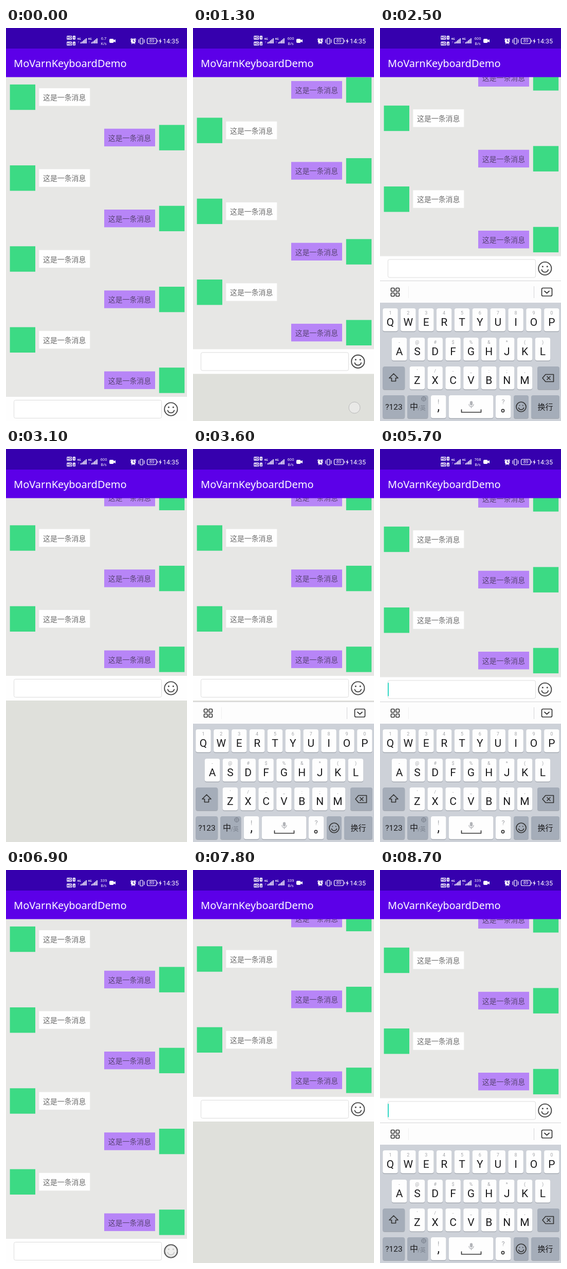
An HTML page that plays this animation: 352 px wide and 764 px high, repeating every 8.8 s.

```html
<!DOCTYPE html>
<html lang="zh">
<head>
<meta charset="utf-8">
<style>
html, body { margin: 0; width: 100%; height: 100%; overflow: hidden; background: #e7e7e5; }
svg { display: block; width: 352px; height: 764px; font-family: "Noto Sans", "Noto Sans CJK SC", "Noto Sans CJK", sans-serif; }
.mid { text-anchor: middle; }
.line { fill: none; stroke: #333; stroke-width: 1.7; stroke-linecap: round; stroke-linejoin: round; }
.white { stroke: #fff; stroke-width: 1.2; }
.key { font: 21px Roboto, "Noto Sans CJK SC", sans-serif; fill: #1b1b1d; text-anchor: middle; }
.hint { font: 9px Roboto, sans-serif; fill: #a2a4a8; text-anchor: middle; }
</style>
</head>
<body>
<svg viewBox="0 0 352 764">
  <rect width="352" height="764" fill="#e7e7e5"/>
  <g id="chat">
    <g id="list"></g>
    <rect y="764" width="352" height="300" fill="#dfe0db"/>
    <rect y="717" width="352" height="48" fill="#fefefe"/>
    <rect x="15.5" y="723.5" width="287" height="35" rx="3" fill="#fff" stroke="#dcdcdc"/>
    <rect id="caret" x="15" y="728" width="2" height="26" fill="#2fd6c4"/>
    <g class="line" style="stroke:#454545;stroke-width:1.9">
      <circle cx="320.8" cy="741" r="12.6"/>
      <path d="M314.5 743.5a6.6 6.6 0 0 0 12.6 0"/>
      <path d="M316.3 737.3h.1M325.2 737.3h.1" stroke-width="3"/>
    </g>
  </g>
  <g id="board">
    <rect y="491" width="352" height="273" fill="#cdd1d8"/>
    <rect y="491" width="352" height="43" fill="#fdfdfd"/>
    <path d="M0 491.5H352" stroke="#d3d3d5"/>
    <path d="M55.5 502v23" stroke="#f0f0f0"/>
    <path d="M299.5 502v23" stroke="#d4d4d6"/>
    <g class="line">
      <rect x="21.5" y="505.5" width="6.5" height="6.5" rx="1.5"/>
      <rect x="31" y="505.5" width="6.5" height="6.5" rx="1.5"/>
      <rect x="21.5" y="515" width="6.5" height="6.5" rx="1.5"/>
      <rect x="31" y="515" width="6.5" height="6.5" rx="1.5"/>
      <rect x="314.5" y="505.5" width="20" height="15.5" rx="2.5"/>
      <path d="M320 511.5l4.5 4 4.5-4"/>
    </g>
    <g id="keys"></g>
    <g class="line">
      <path d="M26.5 672l-8.5 8.5h4.5v6h8v-6h4.5z"/>
      <path d="M322 673.5h15.5v14H322l-6-7zM325 677.5l6 6m0-6l-6 6"/>
      <path d="M158.500 742v5h38v-5"/>
      <circle cx="274.500" cy="736.500" r="9.500"/>
      <path d="M269.500 738.500a5.300 5.300 0 0 0 10 0M271.300 733.700h.1M277.700 733.700h.1"/>
      <g style="stroke:#b2b4b8;stroke-width:1.300">
        <rect x="175.500" y="726" width="4" height="7" rx="2" fill="#b2b4b8"/>
        <path d="M173 731.500a4.500 4.500 0 0 0 9 0M177.500 736v2.500"/>
        <circle cx="85" cy="721" r="4" style="stroke:#7b828e"/>
        <path d="M81 721h8M85 717v8" style="stroke:#7b828e;stroke-width:.8"/>
      </g>
    </g>
  </g>
  <rect width="352" height="40" fill="#3600ae"/>
  <rect y="40" width="352" height="55.500" fill="#5c00e8"/>
  <text x="15" y="76" font-size="20" fill="#fff">MoVarnKeyboardDemo</text>
  <g fill="#fff">
    <g id="status"></g>
    <g font-size="7.500" class="mid"><text id="rate" x="190" y="23"></text><text id="unit" x="190" y="33"></text></g>
    <rect x="201" y="21" width="8.500" height="8" rx="2"/>
    <path d="M209 24l4-2v6l-4-2z"/>
    <circle cx="247.500" cy="25.500" r="4.800"/>
    <path d="M242 22.500l3-2.500M253 22.500l-3-2.500M244 31l1-1M251 31l-1-1" class="white"/>
    <path d="M247.500 22.500v3.500h2.500" class="line" style="stroke:#3600ae;stroke-width:1.100"/>
    <g class="line white">
      <rect x="260.800" y="20" width="5.400" height="11" rx="1"/>
      <path d="M258 22.500v6M269 22.500v6"/>
      <rect x="274.500" y="20" width="18" height="10.500" rx="2.500"/>
      <path d="M294.800 23.500v3.500"/>
    </g>
    <text x="283.500" y="28.300" font-size="8.500" class="mid">89</text>
    <path d="M301 20l-3.500 6h2.300l-.8 5 3.700-6.300h-2.300z"/>
    <text x="305" y="30" font-size="12.500" style="font-family:Roboto,sans-serif">14:35</text>
  </g>
  <g id="touch"><circle r="11" fill="#ebebea" fill-opacity=".8" stroke="#b9b9b9"/></g>
</svg>
<script>
const $ = id => document.getElementById(id);
const rect = (x, y, w, h, fill, r = 0) => `<rect x="${x}" y="${y}" width="${w}" height="${h}" rx="${r}" fill="${fill}"/>`;
const text = (x, y, s, attrs) => `<text x="${x}" y="${y}" ${attrs}>${s}</text>`;

// Chat messages alternate between the two sides.
let html = '';
for (let i = 0; i < 8; i++) {
  const y = 109.8 + i * 78.63, mine = i % 2;
  html += rect(mine ? 297.8 : 7.6, y, 49.4, 49.4, '#3cda84') +
    rect(mine ? 191 : 64.3, y + 7.3, 99, 34.4, mine ? '#b785f7' : '#fefefe') +
    text(mine ? 198.8 : 72, y + 30.3, '这是一条消息', `font-size="13.9" fill="${mine ? '#594475' : '#6d6d6d'}"`);
}
$('list').innerHTML = html;

const cap = (x, y, w, dark) => rect(x, y + 1, w, 45, '#a5aab2', 4) + rect(x, y, w, 44.5, dark ? '#a5adb9' : '#fefefe', 4);
html = '';
[['QWERTYUIOP', '1234567890', 5.3, 545], ['ASDFGHJKL', '-@#$%&*()', 22.8, 602], ['ZXCVBNM', "'/-_:;,", 57.6, 658]]
  .forEach(([letters, hints, x0, y]) => [...letters].forEach((c, i) => {
    const x = x0 + i * 34.87, mid = x + 14.7;
    html += cap(x, y, 29.4) + text(mid, y + 12, hints[i].replace('&', '&amp;'), 'class="hint"') +
      text(mid, y + 34, c, 'class="key"');
  }));
html += cap(5.3, 658, 43, 1) + cap(306, 658, 43, 1);
[[5.3, 43, 1], [53, 40.5, 1], [99, 29.4], [133.8, 86.5], [225, 29.4], [260, 29, 1], [294, 55, 1]]
  .forEach(([x, w, dark]) => html += cap(x, 714, w, dark));
html += text(27, 742, '?123', 'class="key" style="font-size:15.5px"') +
  text(66, 742, '中', 'class="key" style="font-size:16px"') +
  text(81, 743, '/英', 'class="key" style="font-size:11px;fill:#7b828e"') +
  text(113.7, 731, '!', 'class="hint" style="font-size:13px"') +
  text(113.7, 744, ',', 'class="key" style="font-size:25px"') +
  text(239.7, 731, '?', 'class="hint" style="font-size:13px"') +
  '<circle cx="239" cy="744" r="2.6" class="line"/>' +
  text(321.500, 742, '换行', 'class="key" style="font-size:15px"');
$('keys').innerHTML = html;

html = '';
for (let i = 0; i < 2; i++) {
  const y = 15 + i * 11.5, x = 139 + i * 21;
  html += rect(118, y, 10.5, 7.5, '#fff', 1.5) + rect(130, y, 5, 7.5, '#fff', 1) +
    text(123.2, y + 6.2, 'HD', 'class="mid" font-size="6.5" font-weight="700" fill="#3600ae"') +
    text(132.5, y + 6.2, i + 1, 'class="mid" font-size="6" font-weight="700" fill="#3600ae"') +
    text(x - .5, 23, '4G', 'font-size="5.500" font-weight="700"') +
    text(x, 30, '↑↓', 'font-size="4"');
  for (let b = 0; b < 5; b++) html += rect(x + 6 + b * 2.5, 28 - b * 2, 1.7, 2 + b * 2, '#fff');
}
$('status').innerHTML = html;

// Moves: [start, duration, value to reach]
const lifts = [[1183, 300, 276], [1950, 100, 273.5], [2800, 200, 276], [3600, 100, 273.5], [4570, 220, 0],
  [5400, 250, 273.5], [6300, 220, 0], [7000, 300, 276], [8300, 100, 273.5]];
const boards = [[1700, 250, 1], [2800, 250, 0], [3400, 190, 1], [4570, 220, 0], [5400, 250, 1], [6300, 220, 0], [8150, 240, 1]];
// Taps: [start, end, x, y]
const taps = [[1080, 1360, 314, 738], [1550, 1720, 321, 467], [2650, 2820, 321, 467], [3250, 3420, 321, 467],
  [6840, 7040, 321, 741], [8000, 8170, 321, 467]];
const rates = [[0, '6.7', 'K/s'], [800, '600', 'B/s'], [3800, '768', 'B/s'], [6800, '339', 'B/s']];

const valueAt = (moves, t) => moves.reduce((v, [start, dur, to]) => {
  const p = Math.min(1, Math.max(0, (t - start) / dur));
  return v + (to - v) * (1 - Math.cos(Math.PI * p)) / 2;
}, 0);
const last = (rows, t) => rows.filter(r => r[0] <= t).pop();

function draw(now) {
  const t = now % 8800;
  $('chat').setAttribute('transform', `translate(0 ${-valueAt(lifts, t)})`);
  $('board').setAttribute('transform', `translate(0 ${273 * (1 - valueAt(boards, t))})`);
  const shown = last(boards, t), blink = shown ? t - shown[0] - 250 : -1;
  $('caret').style.opacity = shown && shown[2] && blink >= 0 && blink % 1000 < 500 ? 1 : 0;
  const tap = taps.find(([a, b]) => t >= a && t < b);
  $('touch').style.opacity = tap ? 1 : 0;
  if (tap) $('touch').setAttribute('transform', `translate(${tap[2]} ${tap[3]})`);
  const [, rate, unit] = last(rates, t);
  $('rate').textContent = rate;
  $('unit').textContent = unit;
}
const begin = performance.now();
(function frame() {
  draw(performance.now() - begin);
  requestAnimationFrame(frame);
})();
</script>
</body>
</html>
```
